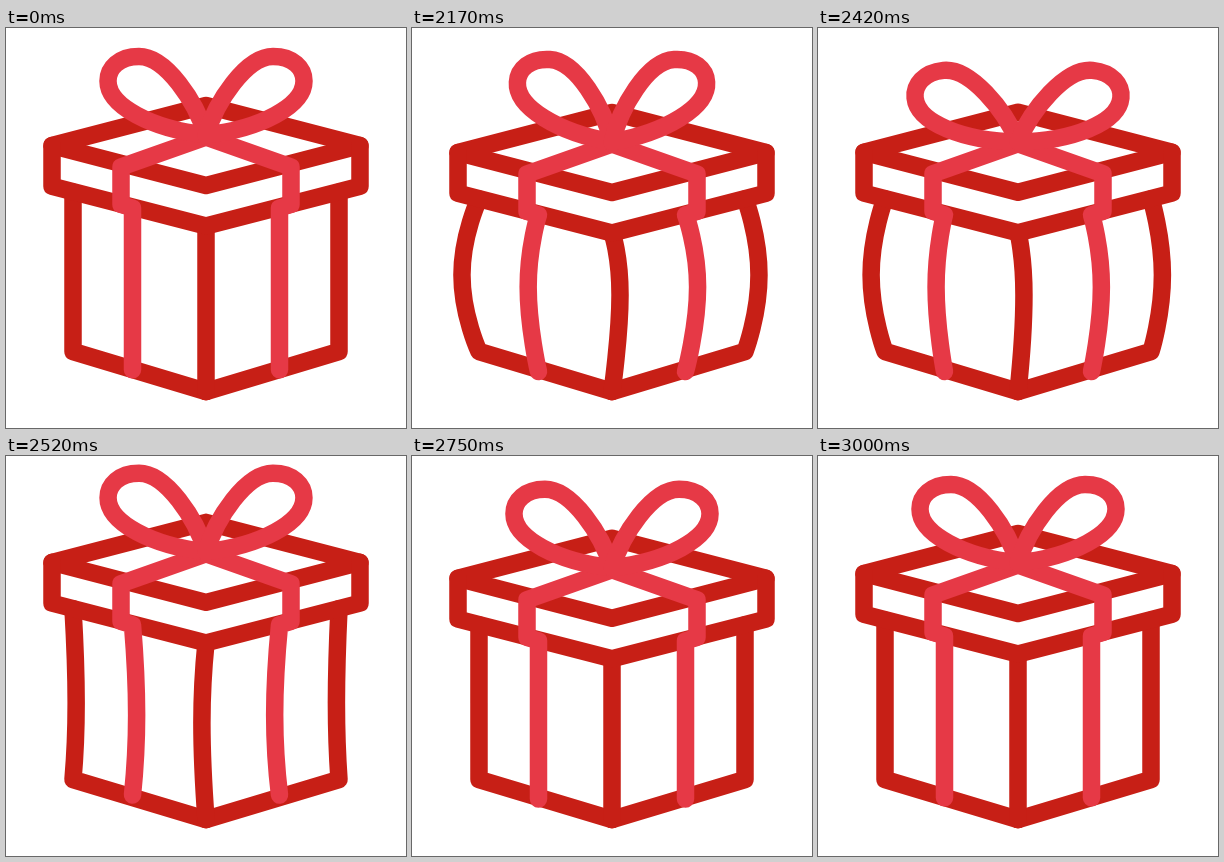
These frames come from a looping animation (400x400 px, 3020 ms). An HTML page with a canvas:

```html
<!DOCTYPE html>
<html lang="en">
<head>
<meta charset="utf-8">
<title>Gift box</title>
<style>
  html, body { margin: 0; width: 100%; height: 100%; overflow: hidden; background: #fff; }
  canvas { display: block; width: 100vw; height: 100vh; }
</style>
</head>
<body>
<canvas id="stage"></canvas>
<script>
const LOOP = 3020, START = 2020;
const RED = '#c71f16', PINK = '#e63946';
const canvas = document.getElementById('stage');
const ctx = canvas.getContext('2d');
const dpr = Math.max(1, window.devicePixelRatio || 1);
canvas.width = canvas.height = 400 * dpr;

// Key poses: lid drop, side bulge, ribbon bulge, front edge bulge, loop droop
const times = [2020, 2095, 2170, 2285, 2420, 2520, 2565, 2650, 2750, 2870, 3000];
const tracks = {
  lid:    [0.8, 3.4, 6.9, 9.3, 6.9, -11, -15, -3.5, 4.8, 2, 0],
  side:   [-3, -11, -17, -19, -14, 3, 8, 3.5, 0, 0, 0],
  ribbon: [-1.3, -6, -10.3, -11.3, -8.5, 4, 10, 6.6, 0, 0, 0],
  front:  [1.5, 5, 8, 8.5, 6, -4, -9, -5, 0, 0, 0],
  droop:  [-0.005, -0.035, -0.06, 0, 0.1, 0, -0.06, -0.085, 0, 0.01, 0]
};

// Smooth curve through the keys
function sample(v, t) {
  const last = times.length - 1;
  if (t < START || t >= times[last]) return 0;
  let i = 0;
  while (t >= times[i + 1]) i++;
  const slope = k => {
    if (k === last) return 0;
    const a = Math.max(0, k - 1), b = k + 1;
    return (v[b] - v[a]) / (times[b] - times[a]);
  };
  const h = times[i + 1] - times[i], u = (t - times[i]) / h;
  const u2 = u * u, u3 = u2 * u;
  return (2 * u3 - 3 * u2 + 1) * v[i] + (u3 - 2 * u2 + u) * h * slope(i)
    + (3 * u2 - 2 * u3) * v[i + 1] + (u3 - u2) * h * slope(i + 1);
}

function stroke(color, build) {
  ctx.strokeStyle = color;
  ctx.beginPath();
  build();
  ctx.stroke();
}

function poly(points) {
  points.forEach(([x, y], i) => i ? ctx.lineTo(x, y) : ctx.moveTo(x, y));
}

// Continues the path down an edge that bows out by b at height mid
function bent(x, y0, y1, mid, b, soft) {
  ctx.bezierCurveTo(x, y0, x + b, mid - soft, x + b, mid);
  ctx.bezierCurveTo(x + b, mid + soft, x, y1, x, y1);
}

function mirrored(draw) {
  for (const s of [1, -1]) {
    ctx.save();
    ctx.translate(200, 0);
    ctx.scale(s, 1);
    ctx.translate(-200, 0);
    draw(s > 0);
    ctx.restore();
  }
}

function drawBody(p, soft) {
  mirrored(left => stroke(RED, () => {
    const top = 164 + p.lid;
    ctx.moveTo(67, top);
    bent(67, top, 323.5, 247, left ? p.side : p.side * 0.82, soft);
    ctx.lineTo(200, 363.5);
  }));
  stroke(RED, () => {
    const top = 198 + p.lid;
    ctx.moveTo(200, top);
    bent(200, top, 363.5, 267, p.front, soft);
  });
}

function drawLid() {
  stroke(RED, () => {
    poly([[46, 117.5], [200, 77.5], [354, 117.5], [200, 157.5]]);
    ctx.closePath();
  });
  stroke(RED, () => poly([[46, 117.5], [46, 158.3], [200, 198], [354, 158.3], [354, 117.5]]));
}

function drawRibbon(p, soft) {
  const d = p.lid;
  mirrored(left => stroke(PINK, () => {
    poly([[200, 109 + d], [115, 139 + d], [115, 176.5 + d], [126.5, 180 + d]]);
    bent(126.5, 180 + d, 341.8 + 0.25 * d, 259, left ? p.ribbon : p.ribbon * 1.17, soft);
  }));
}

function drawBow(p) {
  mirrored(() => {
    ctx.translate(200, 107 + p.lid);
    ctx.rotate(-p.droop);
    stroke(PINK, () => {
      ctx.moveTo(0, 0);
      ctx.bezierCurveTo(-10, -33, -40, -78.5, -67, -78.5);
      ctx.bezierCurveTo(-87, -78.5, -98, -67, -98, -54);
      ctx.bezierCurveTo(-98, -29, -54, -6, 0, 0);
    });
  });
}

function render(t) {
  const p = {};
  for (const name in tracks) p[name] = sample(tracks[name], t);
  const soft = t < 2170 ? Math.min(40, Math.abs(p.side) * 3.5) : 40;
  ctx.setTransform(dpr, 0, 0, dpr, 0, 0);
  ctx.fillStyle = '#fff';
  ctx.fillRect(0, 0, 400, 400);
  ctx.lineWidth = 17.5;
  ctx.lineCap = ctx.lineJoin = 'round';
  drawBody(p, soft);
  ctx.save();
  ctx.translate(0, p.lid);
  drawLid();
  ctx.restore();
  drawRibbon(p, soft);
  drawBow(p);
}

function frame() {
  render(performance.now() % LOOP);
  requestAnimationFrame(frame);
}
frame();
</script>
</body>
</html>
```
